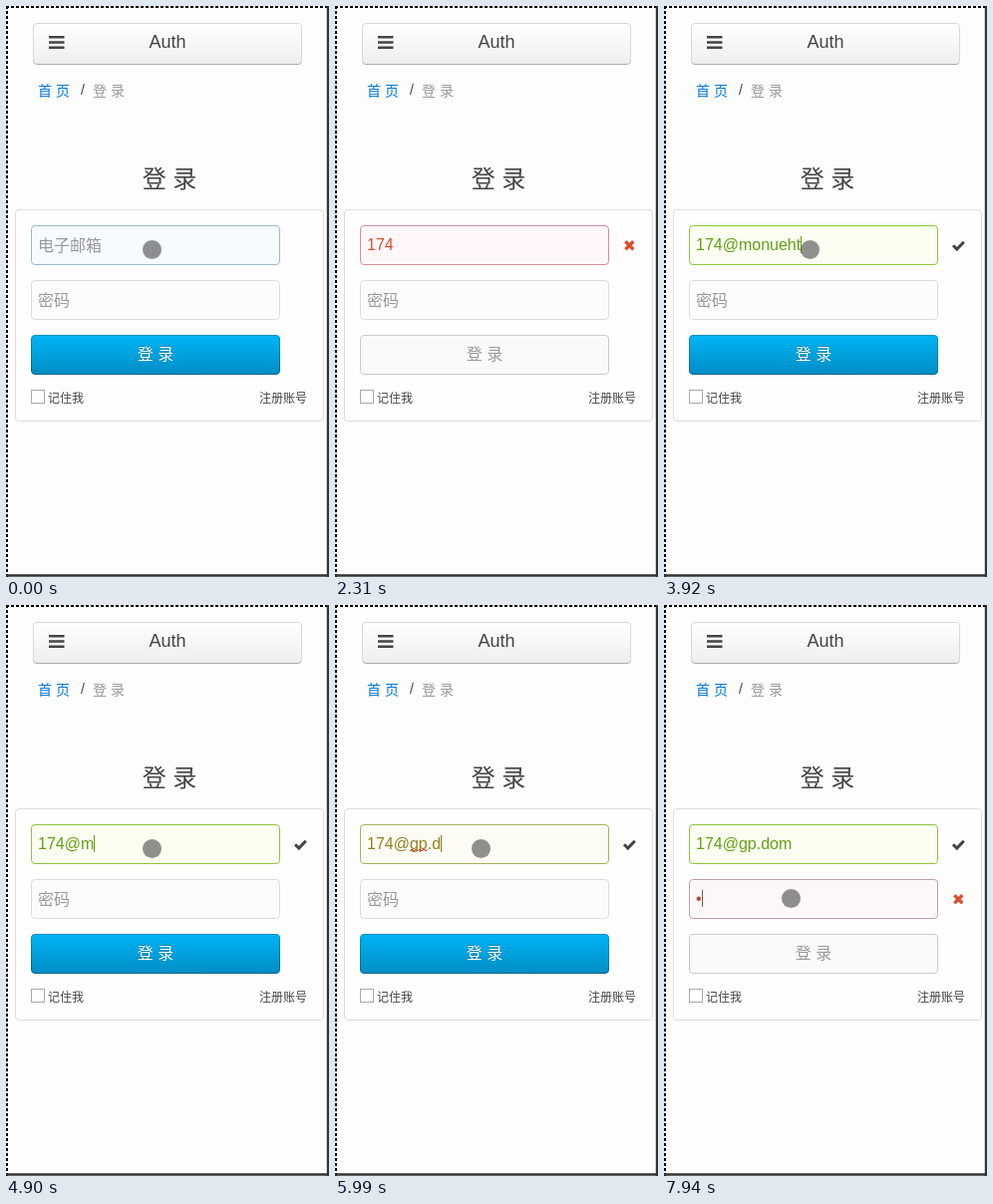
These frames come from a looping animation (324x573 px, 8000 ms). An HTML page:

```html
<!DOCTYPE html>
<html lang="zh">
<head>
<meta charset="utf-8">
<title>登录</title>
<style>
  html, body { margin: 0; width: 100%; height: 100%; overflow: hidden; background: #fdfdfd; }
  svg { display: block; width: 324px; height: 573px; }
  text { font: 16px "Liberation Sans", Arial, "Noto Sans CJK SC", "Noto Sans CJK", sans-serif; fill: #444; white-space: pre; }
  .cjk { font-weight: 300; }
  .hint { fill: #999; }
  .s12 { font-size: 12px; }
  .s14 { font-size: 14px; }
  .s18 { font-size: 18px; }
  .s24 { font-size: 24px; }
  .box { rx: 3.5px; stroke: #ddd; fill: #fcfcfc; }
  .check { fill: none; stroke: #444; stroke-width: 3; }
  .cross { fill: none; stroke: #d85030; stroke-width: 3.4; }
  #on text { fill: #fff; filter: drop-shadow(0 -1px 0 rgba(0, 0, 0, .25)); }
  #off rect { fill: #fafafa; stroke: #cbcbcb; }
</style>
</head>
<body>
<svg viewBox="0 0 324 573">
  <defs>
    <linearGradient id="grey" x2="0" y2="1"><stop stop-color="#fff"/><stop offset="1" stop-color="#eee"/></linearGradient>
    <linearGradient id="greyEdge" x2="0" y2="1"><stop offset=".9" stop-color="#d9d9d9"/><stop offset="1" stop-color="#adadad"/></linearGradient>
    <linearGradient id="blue" x2="0" y2="1"><stop stop-color="#00b4f5"/><stop offset="1" stop-color="#008dc5"/></linearGradient>
    <linearGradient id="blueEdge" x2="0" y2="1"><stop stop-color="#0090c4"/><stop offset="1" stop-color="#00638a"/></linearGradient>
  </defs>

  <rect width="324" height="573" fill="#fdfdfd"/>
  <path d="M0 1H324M1 0V573" stroke="#000" stroke-width="2" stroke-dasharray="3 2"/>
  <path d="M323 0V573M0 571.5H324" stroke="#333336" stroke-width="2.4"/>

  <rect x="27.5" y="17.5" width="269" height="41" rx="3.5" fill="url(#grey)" stroke="url(#greyEdge)"/>
  <path d="M43 31.3h15.5M43 36.5h15.5M43 41.7h15.5" stroke="#444" stroke-width="2.6"/>
  <text class="s18" x="162" y="42" text-anchor="middle">Auth</text>

  <text class="cjk s14" x="32" y="89.5" style="fill:#07d">首 页</text>
  <text class="s14" x="75" y="89">/</text>
  <text class="cjk s14 hint" x="87" y="89.5">登 录</text>
  <text class="cjk s24" x="164" y="182" text-anchor="middle">登 录</text>

  <rect class="box" x="9.5" y="204.5" width="309" height="212" style="fill:#fefefe"/>

  <g id="mail">
    <rect class="box" x="25.5" y="220.5" width="249" height="39"/>
    <text class="cjk hint" x="32" y="246">电子邮箱</text>
    <text class="value" x="32" y="245"></text>
    <rect class="caret" y="231" width="1" height="17"/>
    <path class="check" d="M290 240.3l3.8 3.8 7-7.4"/>
    <path class="cross" d="M291.3 236.3l8 8m0-8l-8 8"/>
  </g>
  <path id="wave" d="M75 247l2-2 2 2 2-2 2 2 2-2 2 2 2-2 2 2 2-2" fill="none" stroke="#f33"/>

  <g id="pass">
    <rect class="box" x="25.5" y="275.5" width="249" height="39"/>
    <text class="cjk hint" x="32" y="300.5">密码</text>
    <text class="value" x="32" y="300"></text>
    <rect class="caret" y="286" width="1" height="17"/>
    <path class="check" d="M290 295.3l3.8 3.8 7-7.4"/>
    <path class="cross" d="M291.3 291.3l8 8m0-8l-8 8"/>
  </g>

  <g id="on">
    <rect x="25.5" y="330.5" width="249" height="39" rx="3.5" fill="url(#blue)" stroke="url(#blueEdge)"/>
    <text class="cjk" x="150" y="355" text-anchor="middle">登 录</text>
  </g>
  <g id="off">
    <rect x="25.5" y="330.5" width="249" height="39" rx="3.5"/>
    <text class="cjk hint" x="150" y="355" text-anchor="middle">登 录</text>
  </g>

  <rect x="25.5" y="385.5" width="13" height="13" fill="#fff" stroke="#a9a9a9"/>
  <text class="cjk s12" x="42" y="397.5">记住我</text>
  <text class="cjk s12" x="254" y="397.5">注册账号</text>

  <circle id="dot" r="9.5" fill="#464646" fill-opacity=".6"/>
</svg>

<script>
const LOOP = 8000;

// text, border and background colour of a field
const tones = {
  plain: [[68, 68, 68], [221, 221, 221], [252, 252, 252]],
  focus: [[68, 68, 68], [153, 186, 202], [245, 251, 254]],
  bad: [[216, 80, 48], [220, 141, 153], [255, 247, 248]],
  good: [[101, 159, 19], [142, 199, 59], [250, 255, 242]]
};

const start = {
  mail: '', mailTone: ['focus', 'focus', 1],
  pass: '', passTone: ['plain', 'plain', 1],
  caret: '', wave: false, dot: [146.5, 244.5]
};

const type = (mail, more) => ({ mail, caret: 'mail', ...more });
const mailTone = (from, to, p) => ({ mailTone: [from, to, p] });
const passTone = (from, to, p) => ({ passTone: [from, to, p] });

const steps = [
  [430, { caret: 'mail' }],
  [890, { caret: '' }],
  [1140, type('1', mailTone('focus', 'bad', .6))],
  [1290, type('17', mailTone('focus', 'bad', 1))],
  [1440, type('174')],
  [2030, { caret: '' }],
  [2310, { dot: null }],
  [2460, type('174@')],
  [2580, { dot: start.dot }],
  [2730, type('174@m', mailTone('bad', 'good', .22))],
  [2850, mailTone('bad', 'good', 1)],
  [3000, type('174@mo')],
  [3120, type('174@mon')],
  [3250, type('174@monu')],
  [3370, type('174@monue')],
  [3520, type('174@monueh')],
  [3920, type('174@monueht')],
  [4200, type('174@monueh')],
  [4350, type('174@monue')],
  [4470, type('174@monu')],
  [4600, type('174@mon')],
  [4750, type('174@mo')],
  [4900, type('174@m')],
  [5020, type('174@', mailTone('good', 'bad', .4))],
  [5150, mailTone('good', 'bad', 1)],
  [5300, type('174@g', mailTone('bad', 'good', .35))],
  [5450, mailTone('bad', 'good', 1)],
  [5600, type('174@gp')],
  [5720, type('174@gp.', { wave: true, ...mailTone('good', 'bad', .4) })],
  [5870, mailTone('good', 'bad', 1)],
  [5990, type('174@gp.d', mailTone('bad', 'good', .6))],
  [6140, type('174@gp.do', mailTone('bad', 'good', 1))],
  [6270, type('174@gp.dom')],
  [6820, { caret: '', dot: [132, 270] }],
  [6950, { dot: [119.5, 294.5] }],
  [7100, { wave: false, dot: [127.5, 294.5], ...passTone('plain', 'focus', .4) }],
  [7230, passTone('plain', 'focus', 1)],
  [7350, { caret: 'pass' }],
  [7810, { caret: '' }],
  [7940, { pass: '•', caret: 'pass', ...passTone('focus', 'bad', .65) }]
];

const $ = s => document.querySelector(s);
const show = (el, on) => { el.style.display = on ? '' : 'none'; };
const mix = (a, b, p) => `rgb(${a.map((v, i) => Math.round(v + (b[i] - v) * p))})`;

function drawField(id, text, [from, to, p], focused) {
  const part = s => $(`#${id} ${s}`);
  const [ink, edge, back] = tones[from].map((c, i) => mix(c, tones[to][i], p));
  const box = part('.box'), value = part('.value'), caret = part('.caret');
  box.style.stroke = edge;
  box.style.fill = back;
  value.textContent = text;
  value.style.fill = caret.style.fill = ink;
  caret.setAttribute('x', Math.round(32 + (text ? value.getComputedTextLength() : 0)));
  show(caret, focused);
  show(part('.hint'), !text);
  show(part('.check'), to === 'good');
  show(part('.cross'), to === 'bad');
}

function draw(s) {
  drawField('mail', s.mail, s.mailTone, s.caret === 'mail');
  drawField('pass', s.pass, s.passTone, s.caret === 'pass');
  const bad = s.mailTone[1] === 'bad' || s.passTone[1] === 'bad';
  show($('#on'), !bad);
  show($('#off'), bad);
  show($('#wave'), s.wave);
  show($('#dot'), s.dot);
  if (s.dot) $('#dot').setAttribute('transform', `translate(${s.dot})`);
}

const t0 = performance.now();
let last = -1;
function tick() {
  const t = (performance.now() - t0) % LOOP;
  const past = steps.filter(([at]) => at <= t);
  if (past.length !== last) {
    last = past.length;
    draw(Object.assign({}, start, ...past.map(([, change]) => change)));
  }
  requestAnimationFrame(tick);
}
tick();
</script>
</body>
</html>
```
